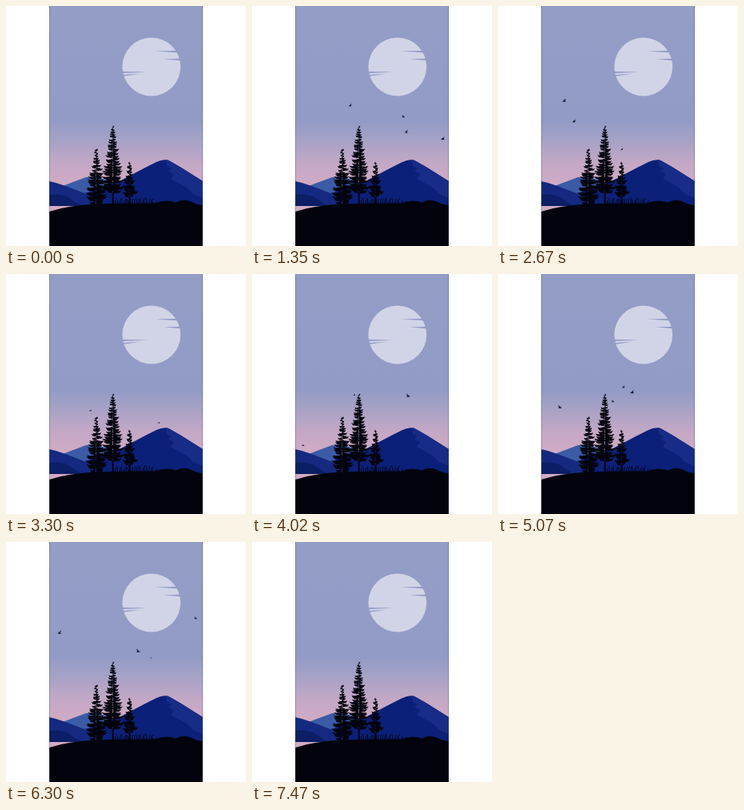
Animation of 300x300 px, one loop 8.13 s. Source, as an HTML page:

```html
<!DOCTYPE html>
<html lang="en">
<head>
<meta charset="utf-8">
<title>Dusk birds</title>
<style>
  html, body { margin: 0; width: 100%; height: 100%; overflow: hidden; background: #fff; }
  svg { display: block; width: 100vw; height: 100vh; }
</style>
</head>
<body>
<svg viewBox="0 0 300 300">
  <defs>
    <linearGradient id="sky" gradientUnits="userSpaceOnUse" x1="0" y1="0" x2="0" y2="226">
      <stop offset="0" stop-color="#939dc6"/>
      <stop offset=".64" stop-color="#929bc5"/>
      <stop offset=".75" stop-color="#a8a2c6"/>
      <stop offset=".87" stop-color="#c3a8c5"/>
      <stop offset="1" stop-color="#d2abc5"/>
    </linearGradient>
    <clipPath id="frame"><rect x="54" width="192" height="300"/></clipPath>
  </defs>
  <g clip-path="url(#frame)">
    <rect x="54" width="192" height="300" fill="url(#sky)"/>
    <circle cx="181.8" cy="76" r="36.4" fill="#d1d4e6"/>
    <path fill="#939cc6" d="M186 56.6L215 55.8V58.3ZM197 66.2L219 65.8V68.2ZM144 81.8L177 82.6L144 84ZM144 86.2L169 84.6L144 88.2Z"/>
    <path fill="#3c5ba6" d="M68 226L100 214L112 213L140 222V245H68Z"/>
    <path fill="#0b2079" d="M90 240L112 228L138 221L174 202L188 195Q199 190 205 194L219 202L246 219V255H90Z"/>
    <path fill="#172c86" d="M200 192Q203 192 206 194.5L219 202L246 219V240L234 235L226 227L206 216L210 210L203 206L207 203L201 200Z"/>
    <path fill="#14297f" d="M54 219Q64 221 73 224.5L106 237L118 250H54Z"/>
    <path fill="#0c1e66" d="M54 236Q68 234 78 239L94 250H54Z"/>
    <g id="birds" fill="#10142a"></g>
    <g id="trees" fill="#03040d"></g>
    <path id="grass" fill="none" stroke="#03040d" stroke-width=".9"/>
    <path fill="#02030c" d="M54 257Q78 249 112 247.5Q150 246 186 246.5Q200 241 212 245.5Q222 240.5 232 245Q240 249 246 249V300H54Z"/>
    <path d="M54.2 0V300M245.8 0V300" stroke="#4c5270" stroke-width=".5"/>
  </g>
</svg>
<script>
const LOOP = 8130, STEP = 30;
const $ = id => document.getElementById(id);

let seed = 7;
const rand = (a, b) => {
  seed = (seed * 16807) % 2147483647;
  return a + (b - a) * seed / 2147483647;
};
const add = (parent, d) => {
  const p = document.createElementNS("http://www.w3.org/2000/svg", "path");
  p.setAttribute("d", d);
  parent.append(p);
  return p;
};

// Conifer: a trunk with layered, upturned branches.
function tree(x, top, foot, width, base) {
  let d = `M${x} ${top}L${x + 1.2} ${base}H${x - 1.2}Z`;
  for (let y = top + 3; y < foot; y += 3.1) {
    const u = (y - top) / (foot - top);
    const reach = width * Math.min(1, .1 + 1.15 * u) * (u > .92 ? .8 : 1);
    for (const side of [-1, 1]) {
      const len = side * reach * rand(.65, 1.08);
      const dy = y + rand(-1.2, 1.2);
      const h = 1.2 + 1.7 * u;
      d += `M${x} ${dy - h}Q${x + len * .5} ${dy + 1} ${x + len} ${dy - .8}` +
           `Q${x + len * .75} ${dy + h + 1.5} ${x + len * .5} ${dy + h}` +
           `Q${x + len * .3} ${dy + h + 1.5} ${x} ${dy + h}Z`;
    }
  }
  add($("trees"), d);
}
tree(133.7, 148, 234, 14.5, 249);
tree(113, 177, 246, 14, 249);
tree(154.5, 193, 239, 10, 248);

let blades = "";
for (let x = 137; x < 187; x += 2.6) {
  const lean = rand(-4, 4), h = rand(4, 7.5);
  blades += `M${x} 248Q${x + lean * .2} ${248 - h} ${x + lean} ${247.5 - h}`;
}
$("grass").setAttribute("d", blades);

// Straight flights: size, a time and place on the way, speed across and climb in px/s.
const birds = [
  [.8, 1350, 123, 124, -114, 45],
  [.9, 1350, 193, 157, -74, 10],
  [1, 2670, 83, 118, -118, 36],
  [.65, 2670, 155, 179, -78, 14],
  [.55, 4020, 128, 151, -88, 48],
  [.75, 5070, 157, 141, -100, 78],
  [1, 6300, 67, 113, -82, 28],
  [.4, 6300, 181, 145, -108, 25],
  [.75, 1350, 189, 138, 125, 88],
  [1, 4020, 195, 152, 110, 58],
  [.75, 6300, 237, 95, 76, 52],
  [1, 6300, 165, 136, 71.5, 24.5]
].map(flight => ({ flight, el: add($("birds"), "") }));

// Body points left; the wings beat about the shoulder.
function birdPath(beat) {
  const tip = -1.6 - 1.1 * beat;
  return "M-3 1.3Q-1.5 .3 0 .5L2.6 1.3L.3 1.7Q-1.5 2 -3 1.3Z" +
         `M-1.2 .9Q0 ${tip * .4} 1.8 ${tip}Q1.2 .2 .7 1.3Z` +
         `M-1 1L-1.6 ${tip * .4}L.3 .8Z`;
}

function draw(now) {
  const t = Math.floor((now % LOOP) / STEP) * STEP;
  for (const { flight, el } of birds) {
    const [size, t0, x0, y0, speed, climb] = flight;
    const s = (t - t0) / 1000;
    const x = x0 + speed * s, y = y0 - climb * s;
    const shown = t >= 270 && t < 7470 && x > 51 && x < 249;
    el.style.display = shown ? "" : "none";
    if (!shown) continue;
    el.setAttribute("d", birdPath(Math.cos(s * Math.PI / .21)));
    el.setAttribute("transform", `translate(${x} ${y}) scale(${-Math.sign(speed) * size} ${size})`);
  }
}

const start = performance.now();
function tick() {
  draw(performance.now() - start);
  requestAnimationFrame(tick);
}
tick();
</script>
</body>
</html>
```
